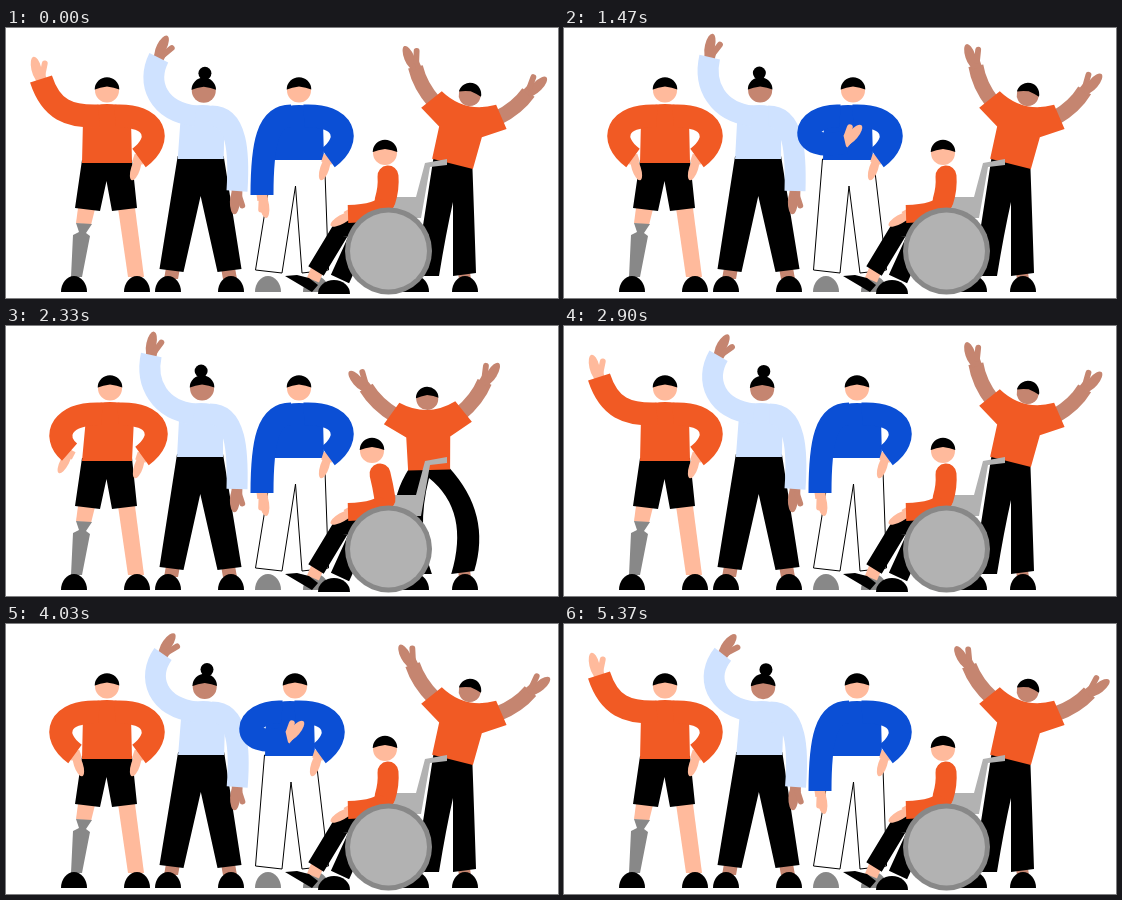
Write an HTML page with a canvas that moves like this. It is 552 px wide and 270 px high and loops after 5.41 s.

```html
<!DOCTYPE html>
<html lang="en">
<head>
<meta charset="utf-8">
<title>Five friends waving</title>
<style>
html, body { margin: 0; width: 100%; height: 100%; overflow: hidden; background: #fff; }
canvas { display: block; }
</style>
</head>
<body>
<canvas id="stage" width="552" height="270"></canvas>
<script>
const ctx = document.getElementById('stage').getContext('2d');
const LOOP = 2705, BEAT = LOOP / 2, RAD = Math.PI / 180;
const ORANGE = '#f15a24', BLUE = '#0b4fd5', SKY = '#cfe2ff', BLACK = '#000',
  PEACH = '#ffba9c', BROWN = '#c58570', GREY = '#b2b2b2', DARK = '#888';

// Timing: a smooth step, a step up and down again, a blend of two poses.
function ease(t, from, to) {
  const u = Math.min(1, Math.max(0, (t - from) / (to - from)));
  return u * u * (3 - 2 * u);
}
const pulse = (t, a, b, c, d) => ease(t, a, b) - ease(t, c, d);
const mix = (a, b, u) => a.map((v, i) => v + (b[i] - v) * u);

function poly(color, ...p) {
  ctx.beginPath();
  for (let i = 0; i < p.length; i += 2) ctx.lineTo(p[i], p[i + 1]);
  ctx.closePath();
  ctx.fillStyle = color;
  ctx.fill();
}

function disc(color, x, y, rx, ry = rx, from = 0) {
  ctx.beginPath();
  ctx.ellipse(x, y, rx, ry, 0, from, 2 * Math.PI);
  ctx.fillStyle = color;
  ctx.fill();
}

function line(color, width, path, cap = 'butt') {
  ctx.strokeStyle = color;
  ctx.lineWidth = width;
  ctx.lineCap = cap;
  ctx.lineJoin = 'round';
  ctx.stroke(new Path2D(path));
}

const shoe = (x, color = BLACK) => disc(color, x, 264, 13, 16, Math.PI);

function head(x, y, skin, r = 12) {
  disc(skin, x, y, r);
  ctx.beginPath();
  ctx.arc(x, y - 1, r + .3, Math.PI, 0);
  ctx.quadraticCurveTo(x + r * .6, y - 3, x, y - 4);
  ctx.quadraticCurveTo(x - r * .6, y - 3, x - r, y - 1);
  ctx.fillStyle = BLACK;
  ctx.fill();
}

// The thumb's sign picks its side, its size how far it spreads.
function hand(x, y, angle, skin, thumb = 0, size = .9) {
  ctx.save();
  ctx.translate(x, y);
  ctx.rotate(angle);
  ctx.scale(size, size);
  line(skin, 12, 'M-3 0 L6 0');
  disc(skin, 12, -2.5 * thumb, 14, 5 + .6 * Math.abs(thumb));
  line(skin, 6.5, `M5 ${3 * thumb} L16 ${8 * thumb}`, 'round');
  ctx.restore();
}

function torso(color, x, top, y, bottom, half) {
  ctx.beginPath();
  ctx.moveTo(x - half, bottom);
  ctx.lineTo(top - half + 1, y + 16);
  ctx.quadraticCurveTo(top - half + 1, y, top, y);
  ctx.quadraticCurveTo(top + half - 1, y, top + half - 1, y + 16);
  ctx.lineTo(x + half, bottom);
  ctx.fillStyle = color;
  ctx.fill();
}

function pants(color, waist, half, top, middle, spread, width, bottom, crotch) {
  const leg = side => [
    [middle + side * spread, bottom - 2],
    [middle + side * (spread - width), bottom + 1]
  ];
  poly(color, waist - half, top, ...leg(-1).flat(), (waist + middle) / 2, crotch,
    ...leg(1).reverse().flat(), waist + half, top);
}

// An arm is two curve points and a cuff, measured from the shoulders' centre.
const HIP = [-49, -2, -57, 24, -32, 42];

function arm(color, x, y, [ax, ay, bx, by, cx, cy], angle, skin, thumb, side = 1, width = 23) {
  ctx.save();
  ctx.translate(x, y);
  ctx.scale(side, 1);
  hand(cx, cy, angle * RAD, skin, thumb);
  line(color, width, `M-8 0 C${ax} ${ay} ${bx} ${by} ${cx} ${cy}`);
  ctx.restore();
}

function first(t) {
  const up = 1 - pulse(t, 900, 1130, 2310, 2450);
  const shift = 3 * pulse(t, 2200, 2320, 2400, 2480);
  const x = 101 + shift, swing = 4 * up * (1 - up);
  const left = mix(HIP, [-38, 1, -56, -6, -66, -37], up);
  left[2] -= 8 * swing;
  left[4] -= 28 * swing;
  left[5] += 4 * swing;
  poly(PEACH, 72, 180, 89, 181, 85, 197, 70, 195);
  poly(PEACH, 112, 180, 129, 180, 138, 249, 122, 249);
  poly(DARK, 70, 195, 86, 196, 80, 205, 84, 208, 76, 249, 65, 249, 67, 207, 73, 204);
  shoe(68);
  shoe(131);
  pants(BLACK, 101, 25, 132, 100, 31, 25, 182, 153);
  torso(ORANGE, 101, x, 76, 135, 25);
  arm(ORANGE, x, 88, HIP, 72, PEACH, 0, -1);
  arm(ORANGE, x, 88, left, 72 + 185 * Math.sqrt(Math.max(0, up)), PEACH, up);
  head(x, 62.5, PEACH);
}

function second(t) {
  const sway = .5 + .5 * Math.cos((t - 769) / (BEAT / 3) * 2 * Math.PI);
  const x = 196 + 4 * sway;
  const raised = mix([-42, -4, -57, -30, -51, -59], [-52, -6, -58, -38, -33, -57], sway);
  const tilt = Math.atan2(raised[5] - raised[3], raised[4] - raised[2]) / RAD;
  poly(BROWN, 160, 240, 174, 240, 172, 251, 158, 251);
  poly(BROWN, 215, 240, 229, 240, 231, 251, 217, 251);
  shoe(162);
  shoe(225);
  pants(BLACK, 194 + 2 * sway, 23, 128, 194.5, 41, 24, 243, 168);
  torso(SKY, 194 + 2 * sway, x - 1, 77, 131, 23);
  arm(SKY, x, 88, [-34, 0, -36, 37, 231 - x < 33 ? -33 : x - 231, 75], 88, BROWN, .8, -1, 21);
  arm(SKY, x, 88, raised, tilt, BROWN, 1, 1, 21);
  disc(BLACK, 195 + 11 * sway, 45 + sway, 6.5);
  head(196 + 5 * sway, 62.5 + sway, BROWN);
}

// The arm's three points, then hand angle and thumb.
const HANG = [-31, 0, -37, 27, -37, 79, 82, .4];
const BELLY = [-46, -4, -47, 40, -16, 38, 15, -.8];
const THUMB = [-47, -2, -54, 38, -3, 26, -50, -.8];

function third(t) {
  const moves = [[420, BELLY], [950, THUMB], [1680, [...HIP, 72, 0]], [2080, HANG]];
  const pose = moves.reduce((p, [start, next]) => mix(p, next, ease(t, start, start + 200)), HANG);
  const [angle, thumb] = pose.splice(6);
  const stance = pulse(t, 420, 620, 1680, 1880);
  const x = 293 - 9 * stance;
  shoe(262, DARK);
  shoe(310, DARK);
  pants('#fff', x, 25.5, 131, 286, 36.5, 26.5, 244, 158);
  ctx.strokeStyle = BLACK;
  ctx.lineWidth = 1;
  ctx.stroke();
  torso(BLUE, x, x, 77, 132, 25);
  arm(BLUE, x - 3, 88, HIP, 72, PEACH, 0, -1);
  arm(BLUE, x, 88, pose, angle, PEACH, thumb);
  head(x + 5 * stance - 9 * pulse(t, 1700, 1880, 2080, 2260), 62.5, PEACH);
}

function fifth(t) {
  const q = 200 + (t + BEAT - 200) % BEAT;
  const right = 1 - pulse(q, 320, 520, 945, 1105);
  const crouch = pulse(q, 330, 430, 430, 530) + pulse(q, 880, 975, 985, 1100);
  const spread = 35 + 27 * (pulse(q, 360, 520, 560, 790) + pulse(q, 920, 1100, 1210, 1400));
  const x = 420 + 27 * right, y = 134 + 8 * crouch, tilt = (22 * right - 8 + 4 * crouch) * RAD;
  const dx = 20 * Math.cos(tilt), dy = 20 * Math.sin(tilt);
  const foot = 401 + 8 * right, toe = 445 + 2 * right, bow = 30 * crouch;
  poly(BROWN, 452, 244, 464, 244, 465, 252, 453, 252);
  shoe(410);
  shoe(459);

  ctx.beginPath();
  ctx.moveTo(x - dx, y - dy);
  ctx.quadraticCurveTo((x - dx + foot) / 2 - bow, 190, foot, 248);
  ctx.lineTo(foot + 24, 248);
  ctx.quadraticCurveTo((x + foot + 24) / 2 - bow / 2, 205, x, y + 40 - bow);
  ctx.quadraticCurveTo((x + toe) / 2 + bow, 200 - bow / 2, toe, 248);
  ctx.lineTo(toe + 23, 245);
  ctx.quadraticCurveTo((x + dx + toe + 23) / 2 + bow, 188, x + dx, y + dy);
  ctx.fillStyle = BLACK;
  ctx.fill();

  ctx.save();
  ctx.translate(x, y);
  ctx.rotate(tilt);
  for (const side of [-1, 1]) {
    const angle = (spread - 3 * side) * RAD;
    const reach = (length, turn) =>
      [side * (34 + length * Math.sin(angle + turn)), -55 - length * Math.cos(angle + turn)];
    const wrist = reach(38, 0);
    line(BROWN, 15, `M${side * 32} -53 Q${reach(20, .25)} ${wrist}`);
    hand(...wrist, side * (angle - .1) - Math.PI / 2, BROWN, -side);
  }
  ctx.beginPath();
  for (const side of [-1, 1]) {
    const half = [[28, -66], [44, -45], [22, -31], [21, 2]];
    for (const [px, py] of side < 0 ? half : half.reverse()) ctx.lineTo(side * px, py);
  }
  ctx.quadraticCurveTo(0, -50, -28, -66);
  ctx.fillStyle = ORANGE;
  ctx.fill();
  head(0, -69, BROWN, 11);
  ctx.restore();
}

function fourth(t) {
  const lean = pulse(t, 1640, 1830, 2340, 2500);
  const raise = pulse(t, 480, 640, 960, 1130);
  poly(GREY, 374, 169, 410, 169, 419, 135, 441, 131, 441, 137, 424, 139, 415, 190, 376, 190);
  line(PEACH, 13, 'M312 240 L307 252');
  poly(BLACK, 279, 248, 291, 247, 303, 250, 312, 257, 306, 264);
  disc(BLACK, 328, 266, 16, 14, Math.PI);
  line(BLACK, 18, 'M378 198 L336 200 L310 243');
  line(BLACK, 20, 'M378 204 L355 205 L334 251');
  if (raise > .02) {
    const x = 376 - 22 * raise, y = 172 - 18 * raise;
    hand(x, y, -88 * RAD, PEACH, .8 * raise, .6 + .35 * raise);
    line(ORANGE, 15, `M378 160 Q${380 - 20 * raise} 182 ${x} ${y}`);
  }
  hand(345, 186, 150 * RAD, PEACH);
  line(ORANGE, 21, `M${382 - 8 * lean} 148 Q${383 - 6 * lean} 160 379 173`, 'round');
  line(ORANGE, 18, 'M380 174 Q374 185 342 186');
  head(379 - 13 * lean, 125, PEACH);
  disc(DARK, 382.5, 223, 43.5);
  disc(GREY, 382.5, 223, 38.5);
}

const start = performance.now();

function draw() {
  const t = (performance.now() - start) % LOOP;
  ctx.fillStyle = '#fff';
  ctx.fillRect(0, 0, 552, 270);
  for (const figure of [first, second, third, fifth, fourth]) figure(t);
  requestAnimationFrame(draw);
}
draw();
</script>
</body>
</html>
```
